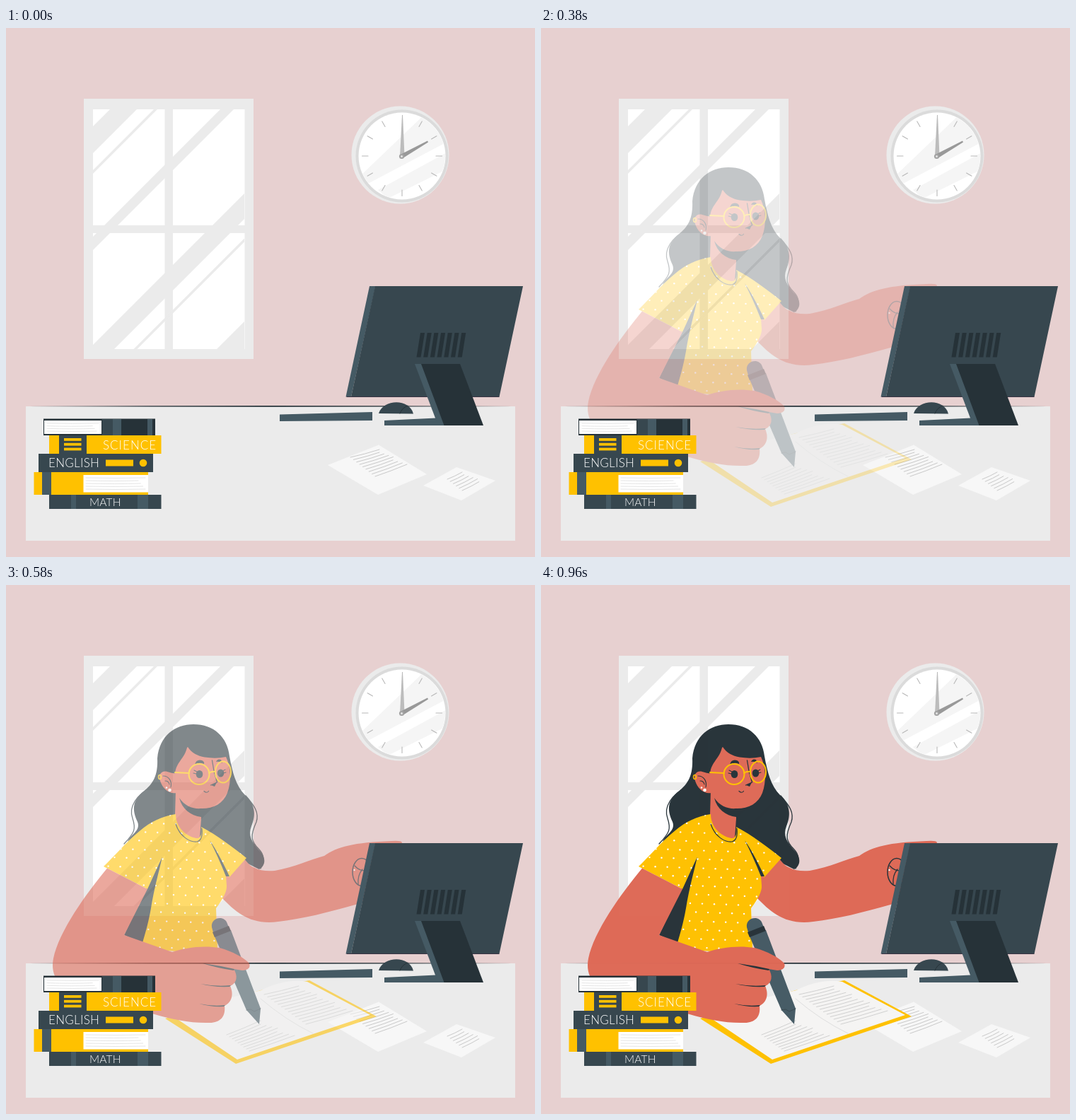
An HTML page with a canvas that plays this animation: 748 by 748 pixels, repeating every 1 s.

```html
<!DOCTYPE html>
<html lang="en">
<head>
<meta charset="utf-8">
<title>Study desk</title>
<style>
html, body { margin: 0; width: 100%; height: 100%; overflow: hidden; background: #e7d0d0; }
canvas { display: block; width: 100vw; height: 100vh; }
</style>
</head>
<body>
<canvas id="stage" width="748" height="748"></canvas>
<script>
const SIZE = 748, FPS = 24, LOOP = 1000;
const WALL = '#e7d0d0', PALE = '#ebebeb', INK = '#263238', SLATE = '#37474f', STEEL = '#455a64';
const GOLD = '#ffc100', SKIN = '#de6956', WHITE = '#fff', PAPER = '#f7f7f7';

const stage = document.getElementById('stage').getContext('2d');

function layer(draw) {
  const canvas = document.createElement('canvas');
  canvas.width = canvas.height = SIZE;
  draw(brush(canvas.getContext('2d')));
  return canvas;
}

// Small drawing vocabulary bound to one context
function brush(c) {
  const b = {
    rect(x1, y1, x2, y2, color) {
      c.fillStyle = color;
      c.fillRect(x1, y1, x2 - x1, y2 - y1);
    },
    fill(d, color) {
      c.fillStyle = color;
      c.fill(new Path2D(d));
    },
    line(d, color, width = 1) {
      c.strokeStyle = color;
      c.lineWidth = width;
      c.lineCap = c.lineJoin = 'round';
      c.stroke(new Path2D(d));
    },
    oval(x, y, rx, ry, color, width) {
      c.beginPath();
      c.ellipse(x, y, rx, ry, 0, 0, 7);
      if (width) {
        c.strokeStyle = color;
        c.lineWidth = width;
        c.stroke();
      } else {
        c.fillStyle = color;
        c.fill();
      }
    },
    dot(x, y, r, color) { b.oval(x, y, r, r, color); },
    // n strokes blended from the first segment to the last one
    rows(n, first, last, color, width = 0.8) {
      for (let i = 0; i < n; i++) {
        const [x1, y1, x2, y2] = first.map((v, k) => v + (last[k] - v) * i / (n - 1));
        const cut = (i * 7 % 4) * 0.04;
        b.line(`M${x1} ${y1}Q${(x1 + x2) / 2} ${(y1 + y2) / 2 + 1} ${x2 - (x2 - x1) * cut} ${y2 - (y2 - y1) * cut}`, color, width);
      }
    },
    clip(d, draw) {
      c.save();
      c.clip(new Path2D(d));
      draw();
      c.restore();
    },
    text(s, x, y, size, gap) {
      c.font = `300 ${size}px Lato, sans-serif`;
      c.letterSpacing = gap + 'px';
      c.fillStyle = WHITE;
      c.fillText(s, x, y);
    }
  };
  return b;
}

function drawWindow(b) {
  b.rect(110, 100, 350, 468, PALE);
  for (const x of [123, 236]) for (const y of [115, 290]) b.rect(x, y, x + 101.5, y + 164, WHITE);
  b.clip('M123 115H337V454H123Z', () => {
    // Each glare band lies between two lines x + y = constant
    const bands = [[262, 300], [324, 329], [418, 437], [571, 607], [634.5, 639.5], [752, 800]];
    for (const [p, q] of bands) b.fill(`M${p - 100} 100H${q - 100}L${q - 470} 470H${p - 470}Z`, PALE);
  });
}

function drawClock(b) {
  const x = 560, y = 181;
  b.dot(557.5, 179.5, 69, PALE);
  b.dot(x, y, 65.5, '#dbdbdb');
  b.dot(x, y, 61.5, WHITE);
  b.clip(`M${x - 61} ${y}a61 61 0 1 0 122 0a61 61 0 1 0 -122 0Z`, () => {
    b.fill('M500 210L592 122L622 162L512 220Z', '#f5f5f5');
    b.fill('M625 175L625 199L540 241L526 229Z', '#f5f5f5');
  });
  for (let i = 1; i < 12; i++) {
    const a = i * Math.PI / 6, s = Math.sin(a), k = -Math.cos(a);
    b.line(`M${x + 48 * s} ${y + 48 * k}L${x + 56.5 * s} ${y + 56.5 * k}`, '#b8b8b8', 1.1);
  }
  b.fill('M560 123H561L563.5 181H557Z', '#bcbcbc');
  b.fill('M596 159.5L597 161.5L562 183.5L558.5 178.5Z', '#999');
  b.dot(559.5, 181.5, 3.6, '#a3a3a3');
  b.dot(559.5, 181.5, 1.5, '#e4e4e4');
}

function drawDesk(b) {
  b.rect(28, 535, 720, 725, PALE);
  b.fill('M28 535Q374 533.2 720 535Q374 536.6 28 535Z', INK);
  b.fill('M387 546.5L518 543V555L387 556Z', STEEL);
  b.fill('M527 545C533 525 570 523 576 545.5Z', SLATE);
  b.line('M557 545Q560 537 568 534', INK, 1);
  b.fill('M527 589.5L595 631L526 660L455 618Z', PAPER);
  b.rows(9, [487, 607, 528, 596], [522, 634, 567, 617], '#bdbdbd');
  b.fill('M637 621L692 640L644 668L590 647Z', PAPER);
  b.rows(6, [624, 638, 645, 628], [645, 654, 672, 640], '#bdbdbd');
}

function drawMonitor(b) {
  b.fill('M514 365H522.5L488 521.5H480.5Z', STEEL);
  b.fill('M522 365H731L697.5 521.5H488Z', SLATE);
  b.line('M482 521.5H697', '#3b3545', 1);
  for (let i = 0; i < 7; i++) {
    const x = 586 + i * 9.7;
    b.fill(`M${x} 431h6l-5.5 34.5h-6Z`, INK);
  }
  b.fill('M535 555L608 551.5L613 562H535Z', STEEL);
  b.fill('M578 475H588L621 562H611Z', STEEL);
  b.fill('M587 475H642L675 562H619.5Z', INK);
}

function drawBooks(b) {
  b.rect(53, 552.5, 211, 576, INK);
  b.rect(54, 555, 135, 574, WHITE);
  b.rows(4, [58, 559, 131, 559], [58, 570, 131, 570], '#dedede');
  b.rect(136, 553, 151, 576, SLATE);
  b.rect(151, 553, 163, 576, STEEL);
  b.rect(200, 553, 207, 576, STEEL);

  b.rect(61, 576, 219.5, 602, GOLD);
  b.rect(75, 576, 114, 602, SLATE);
  for (let y = 580; y < 598; y += 6.8) b.rect(82, y, 106.5, y + 3.8, GOLD);
  b.text('SCIENCE', 137, 595.5, 17, 1);

  b.rect(46, 602, 208, 628, SLATE);
  b.rect(141, 610.5, 180, 619.5, GOLD);
  b.dot(194, 615, 5.3, GOLD);
  b.text('ENGLISH', 60, 620.5, 17, 0.3);

  b.rect(39.5, 628, 201, 660, GOLD);
  b.rect(51, 628, 64, 660, STEEL);
  b.rect(109.5, 632, 201, 656.5, WHITE);
  b.rows(5, [113, 636, 197, 636], [113, 652, 197, 652], '#dedede');

  b.rect(61, 660, 219.5, 680, SLATE);
  b.rect(92, 660, 99, 680, STEEL);
  b.rect(186, 660, 201, 680, STEEL);
  b.text('MATH', 118, 675.5, 15.5, 0.2);
}

function drawHair(b) {
  b.fill('M214 245C217 213 239 197 265 197C294 197 313 215 316 242C320 264 325 284 338 297C352 309 354 325 347 341C342 354 347 362 357 374C368 385 368 396 358 402L338 392L250 345L197 342L172 363C175 353 191 348 186 335C178 318 179 305 193 293C209 281 215 268 214 245Z', INK);
  b.line('M206 285C184 297 173 314 179 330C184 345 182 350 167 366', INK, 1.3);
  b.line('M339 298C352 313 358 322 354 335C345 355 346 362 358 374C365 381 366 391 360 401', INK, 1.3);
}

function drawFace(b) {
  b.fill('M240 290L239 325C240 348 255 362 274 358L276 330V300Z', SKIN);
  b.fill('M245 301C253 313 265 317 276 316V328C261 326 249 317 245 301Z', INK);
  b.fill('M257 229C262 237 271 242 281 243.5Q297 246 311 243C318 257 319 278 313 294C307 309 294 316 277 316C262 316 249 307 241 294C230 296 221 287 218 277C215 268 220 262 228 264C233 265 236 267 239 266C241 250 252 246 256 230Z', SKIN);
  b.line('M222 270C230 270 235 277 233 286M225 277Q230 277 231 282', INK, 1.1);
  b.oval(217.5, 271.5, 2, 3, GOLD, 1.4);
  b.dot(231.5, 290, 2.3, WHITE);
  b.dot(227, 286.5, 1.3, WHITE);

  b.fill('M267 254Q269 246 277 248Q281 250 280 253Q273 250 267 254Z', INK);
  b.fill('M297 250Q299 245 304 247L306 252Q302 249 297 250Z', INK);
  b.oval(273.5, 267.5, 4.8, 5.6, INK);
  b.oval(303.5, 266, 4.8, 5.6, INK);
  b.line('M270 264L266 262M269 267L265 266M306 263L310 261M307 266L311 265', INK, 1.1);
  b.line('M291.5 248L294 263L298.5 279L289.5 283', INK, 1.3);
  b.fill('M290 283L298 279L295 285Z', INK);
  b.line('M280 291.5Q284 295 286.5 291.5', INK, 1.2);

  b.oval(273, 267.5, 14.5, 14.5, GOLD, 2);
  b.oval(307, 264.5, 11, 15, GOLD, 2);
  b.line('M239 265L259 266M287 266Q291 263 296 264', GOLD, 2);
}

function drawFarArm(b) {
  b.fill('M336 385C344 400 360 406 380 404C409 399 430 388 450 383C468 370 492 364 545 362Q559 361 560 364L530 440L494 452C455 463 420 472 385 476C346 481 326 464 304 441L308 405Z', SKIN);
  b.oval(503, 406, 13, 19.5, INK, 1.5);
  b.line('M493 397Q500 405 511 404M504 402Q497 410 498 423', INK, 1.3);
  b.dot(492.5, 403, 1.2, WHITE);
}

function drawShirt(b) {
  const shirt = 'M240 324C220 327 204 335 190 347C168 365 152 385 138 398L200 430L221 384C217 403 209 430 205 457C201 480 196 495 193 506Q230 524 266 515L299 514L297 457Q313 436 312 425L311 411L316 413L340 386C321 371 299 354 276 342C278 352 275 359 269 358C253 355 240 341 240 324Z';
  b.fill('M222 382L198 430L167 495L194 507L210 458Z', INK);
  b.fill(shirt, GOLD);
  b.clip(shirt, () => {
    for (let row = 0; row < 17; row++) {
      for (let col = 0; col < 13; col++) {
        b.dot(130 + col * 17 + (row % 2) * 8.5 - row * 0.4, 322 + row * 12.5 + col * 0.6, 1.2, WHITE);
      }
    }
  });
  b.fill('M288 361Q300 378 316 412L311 412Q300 384 288 361Z', INK);
  b.line('M240 338C246 356 260 364 270 363C277 361 278 353 277 344', INK, 1.2);
}

function drawNotebook(b) {
  b.fill('M225 613L325 677L524 610L429 559L360 573Z', GOLD);
  b.fill('M238 611L327 671L434 635L515 608L426 561C404 557 379 564 361 573L290 590Z', '#f6f5f4');
  b.line('M360 585Q395 615 434 634', '#dedede', 1);
  b.rows(9, [312, 636, 360, 616], [344, 659, 408, 637], '#c6c6c6');
  b.rows(13, [365, 579, 414, 567], [424, 621, 490, 602], '#c6c6c6');
}

function drawPen(b) {
  b.fill('M291 484C289 470 309 466 313 479L317 489L295 498Z', STEEL);
  b.fill('M295 497L318 488L360 599L358 621L340 601Z', STEEL);
  b.fill('M292 491L315 482L318 489L295 498Z', INK);
  b.line('M340 601L346 600L351 603L360 599', SLATE, 1);
}

function drawNearArm(b) {
  b.fill('M143 400.5L200 430L167 495L235 519C252 513 278 509 302 513C320 518 337 527 344 535Q347 544 334 545L322 543C328 552 327 563 317 567C322 578 320 590 309 595C311 610 303 619 288 619C262 620 235 614 210 607L105 578C76 572 62 553 67 528C75 490 112 438 143 400.5Z', SKIN);
  b.fill('M278 535Q301 538 323 543L322 545Q300 542 278 535Z', INK);
  b.fill('M275 564Q297 568 318 566L316 568Q294 569 275 564Z', INK);
  b.fill('M273 592Q292 596 310 594L308 596Q290 597 273 592Z', INK);
}

const back = layer(b => {
  b.rect(0, 0, SIZE, SIZE, WALL);
  drawWindow(b);
  drawClock(b);
  drawDesk(b);
});

const student = layer(b => {
  [drawHair, drawFarArm, drawFace, drawShirt, drawNotebook, drawPen, drawNearArm].forEach(draw => draw(b));
});

const front = layer(b => {
  drawMonitor(b);
  drawBooks(b);
});

function fade(ms) {
  const step = Math.floor(ms / 1000 * FPS + 0.1);
  const u = Math.min(1, Math.max(0, (step - 0.8) / 23.9));
  return u * u * (3 - 2 * u);
}

function render(now) {
  stage.globalAlpha = 1;
  stage.drawImage(back, 0, 0);
  stage.globalAlpha = fade(now % LOOP);
  stage.drawImage(student, 0, 0);
  stage.globalAlpha = 1;
  stage.drawImage(front, 0, 0);
}

const start = performance.now();
function tick() {
  render(performance.now() - start);
  requestAnimationFrame(tick);
}
tick();
</script>
</body>
</html>
```
